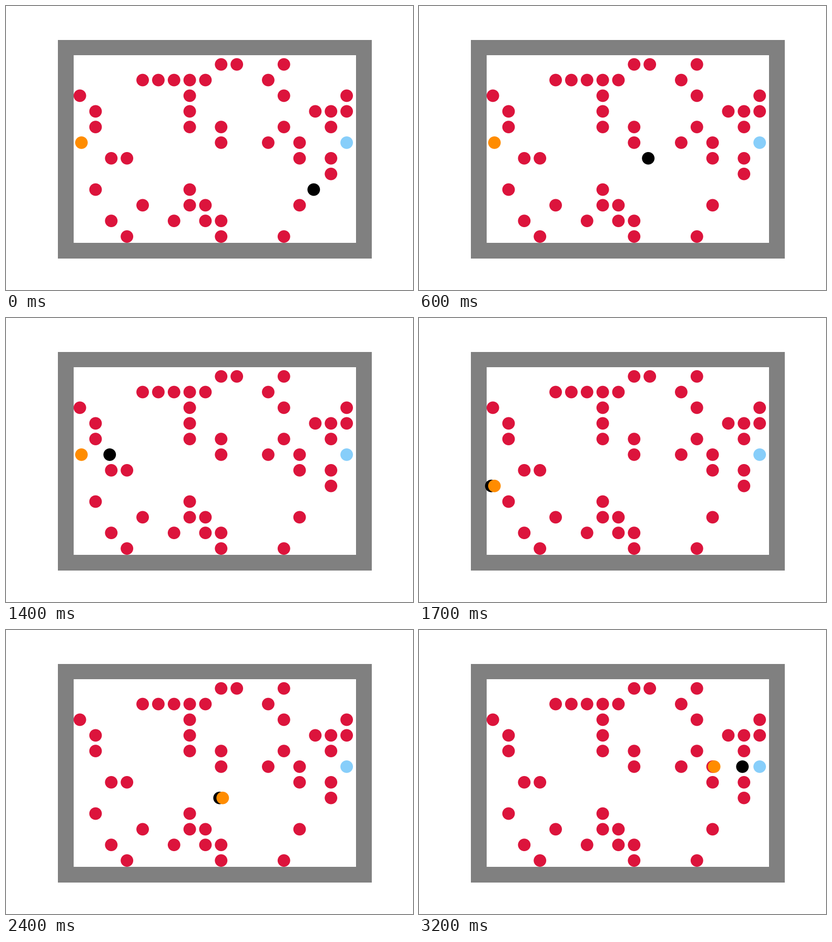
Animation, 800 px wide and 560 px high, one loop 8 s. Source, as a matplotlib script:

```python
import matplotlib.pyplot as plt
from matplotlib.animation import FuncAnimation
from matplotlib.patches import Circle, Rectangle

W, H = 800, 560
CELL = 30.85
LEFT, TOP = 102, 115.2
RADIUS = 0.4 * CELL
FRAMES, INTERVAL = 80, 100

# Obstacle columns, row by row
ROCKS = [
    [10, 11, 14],
    [5, 6, 7, 8, 9, 13],
    [1, 8, 14, 18],
    [2, 8, 16, 17, 18],
    [2, 8, 10, 14, 17],
    [10, 13, 15],
    [3, 4, 15, 17],
    [17],
    [2, 8],
    [5, 8, 9, 15],
    [3, 7, 9, 10],
    [4, 10, 14],
]

STEPS = {"U": (0, -1), "D": (0, 1), "L": (-1, 0), "R": (1, 0), ".": (0, 0)}
FETCH = ".ULLULLL.." + "L" * 6 + "U" + "L" * 4
HAUL = "DD" + "R" * 15 + "UUL"
LEAVE = "RR"


def trace(start, moves):
    path = [start]
    for m in moves:
        dx, dy = STEPS[m]
        x, y = path[-1]
        path.append((x + dx, y + dy))
    return path


agent_path = trace((16, 8), FETCH + HAUL + LEAVE)
load_path = trace((1, 5), "." * len(FETCH) + HAUL + "." * len(LEAVE))


def place(cell, shift):
    col, row = cell
    return LEFT + CELL * (col + shift), TOP + CELL * row


fig = plt.figure(figsize=(W / 100, H / 100), dpi=100, facecolor="white")
ax = fig.add_axes([0, 0, 1, 1])
ax.set_xlim(0, W)
ax.set_ylim(H, 0)
ax.axis("off")


def box(x0, y0, x1, y1, color):
    ax.add_patch(Rectangle((x0, y0), x1 - x0, y1 - y0, facecolor=color,
                           linewidth=0, antialiased=False, zorder=1))


def disc(cell, shift, color, z):
    return ax.add_patch(Circle(place(cell, shift), RADIUS, facecolor=color,
                               linewidth=0, zorder=z))


box(102, 67, 719, 498, "gray")
box(133, 97, 688, 467, "white")
for row, cols in enumerate(ROCKS):
    for col in cols:
        disc((col, row), 0.4, "crimson", 2)
disc((18, 5), 0.4, "lightskyblue", 2)
agent = disc(agent_path[0], 0.3, "black", 3)
load = disc(load_path[0], 0.5, "darkorange", 4)


def update(frame):
    # Four moves every three frames, then rest at the end
    step = min((4 * frame + 2) // 3, len(agent_path) - 1)
    agent.center = place(agent_path[step], 0.3)
    load.center = place(load_path[step], 0.5)
    return agent, load


anim = FuncAnimation(fig, update, frames=FRAMES, interval=INTERVAL,
                     repeat=True, repeat_delay=0)
plt.show()
```
